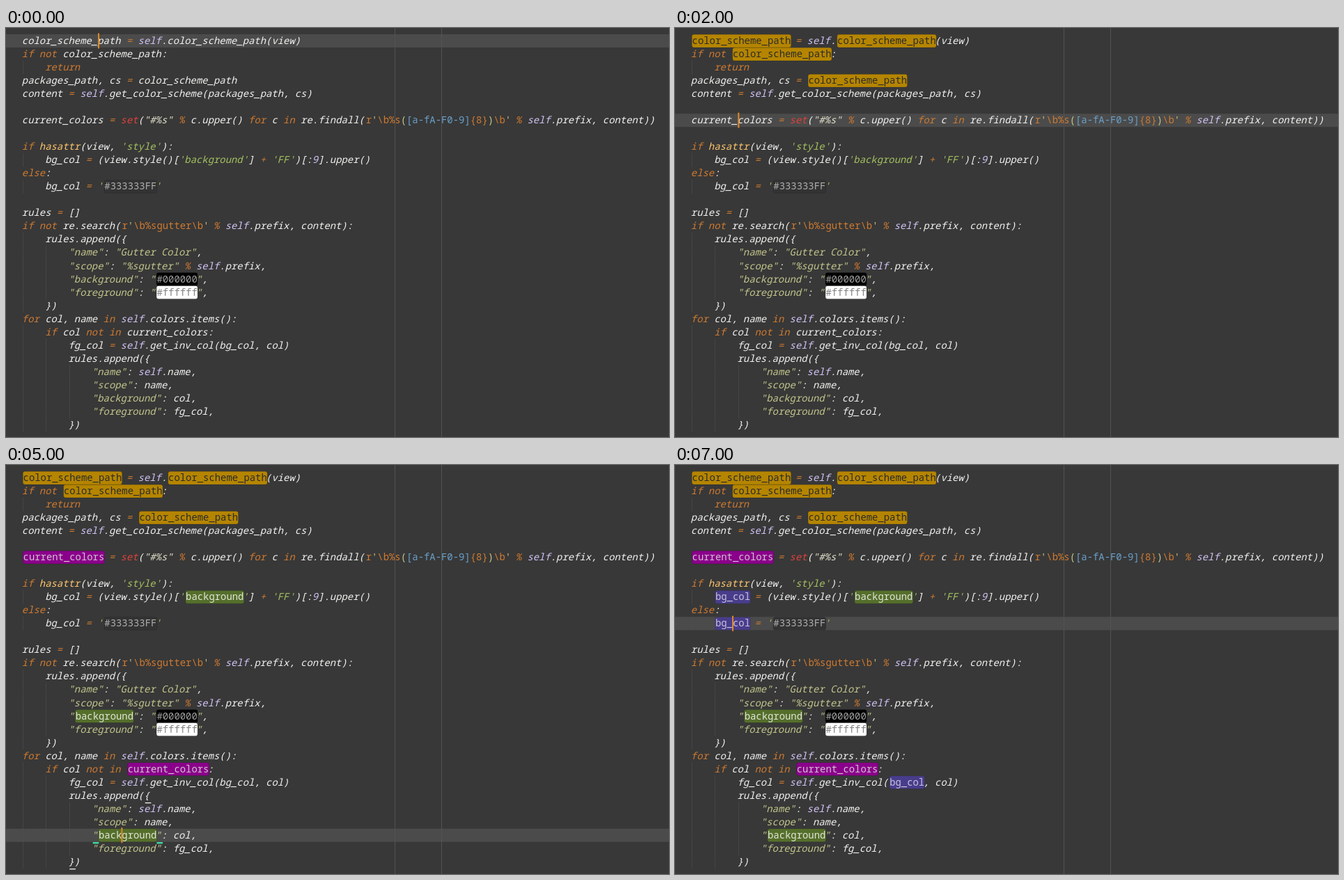
An HTML page for the animation above (8 s loop, 952 px wide and 588 px high).

```html
<!DOCTYPE html>
<html lang="en">
<head>
<meta charset="utf-8">
<title>Highlighting words in an editor</title>
<style>
  html, body { margin: 0; width: 100%; height: 100%; overflow: hidden; background: #383838; }
  svg { display: block; width: 952px; height: 588px; }
  text { font: 300 13.9px "Noto Sans Mono", "DejaVu Sans Mono", monospace; white-space: pre; }
  .code { font-style: italic; }
</style>
</head>
<body>
<svg id="stage" viewBox="0 0 952 588"></svg>
<script>
const source = String.raw`color_scheme_path = self.color_scheme_path(view)
if not color_scheme_path:
    return
packages_path, cs = color_scheme_path
content = self.get_color_scheme(packages_path, cs)

current_colors = set("#%s" % c.upper() for c in re.findall(r'\b%s([a-fA-F0-9]{8})\b' % self.prefix, content))

if hasattr(view, 'style'):
    bg_col = (view.style()['background'] + 'FF')[:9].upper()
else:
    bg_col = '#333333FF'

rules = []
if not re.search(r'\b%sgutter\b' % self.prefix, content):
    rules.append({
        "name": "Gutter Color",
        "scope": "%sgutter" % self.prefix,
        "background": "#000000",
        "foreground": "#ffffff",
    })
for col, name in self.colors.items():
    if col not in current_colors:
        fg_col = self.get_inv_col(bg_col, col)
        rules.append({
            "name": self.name,
            "scope": name,
            "background": col,
            "foreground": fg_col,
        })`.split('\n');

const LEFT = 24.6, TOP = 9, CHAR = 8.34, LINE = 19.03, STEP_MS = 1000, STEPS = 8;
const SLANT_SHIFT = 1.8; // slanted glyphs start left of their cell
const TEXT = '#f2f2f0', ORANGE = '#cf7a30', KHAKI = '#c3c68c', GREEN = '#a5c261', BLUE = '#6a9fc8';
const wordColors = { self: '#d2c3f6', 9: '#d2c3f6', set: '#e0423c', hasattr: '#ffc66d', '"#%s"': '#e4e2cc' };
for (const word of 'if not return for in else = % +'.split(' ')) wordColors[word] = ORANGE;

// Marked words: step of appearance, fill and text colour
const marks = {
  color_scheme_path: [1, '#b58500', '#2c2c2c'],
  current_colors: [3, '#8b008b', '#d2c4d2'],
  background: [5, '#556f2b', '#e2e6da'],
  bg_col: [7, '#483d8b', '#c6c2da']
};
const swatches = {
  '#333333FF': [0, '#333333', '#adadad'],
  '#000000': [0, '#000000', '#a0a0a0'],
  '#ffffff': [0, '#ffffff', '#858585']
};

// Caret row and column, two steps each
const carets = [[0, 13], [6, 8], [27, 17], [11, 7]];

const x = col => LEFT + col * CHAR;
const y = row => TOP + row * LINE;
const rect = (left, top, width, height, fill, extra = '') =>
  `<rect x="${left}" y="${top}" width="${width}" height="${height}" fill="${fill}" ${extra}/>`;
const label = (text, row, col, fill, style) =>
  `<text x="${x(col) - (style ? SLANT_SHIFT : 0)}" y="${y(row) + 14}" fill="${fill}" class="${style}">${text}</text>`;

function piece(text, row, col, color, step, style = 'code') {
  const badge = marks[text] || swatches[text];
  if (!badge || step < badge[0]) return label(text, row, col, color, style);
  const [, fill, ink] = badge;
  return rect(x(col) - 0.3, y(row) + 0.3, text.length * CHAR + 0.6, LINE - 0.4, fill,
    'rx="3" stroke="#000" stroke-opacity=".12"') + label(text, row, col, ink, '');
}

function regexColor(part) {
  if (part[0] === '[') return BLUE;
  return /^['()]/.test(part) ? KHAKI : ORANGE;
}

function codeLine(line, row, step) {
  let out = '';
  for (const { 0: token, index } of line.matchAll(/r'.*?'|"[^"]*"|'[^']*'|\w+|\S/g)) {
    if (token.startsWith("r'")) {
      for (const part of token.matchAll(/\[.*?\]|['()]|[^'()[\]]+/g))
        out += piece(part[0], row, index + part.index, regexColor(part[0]), step, '');
    } else if (/^['"]/.test(token)) {
      const body = token.slice(1, -1), quote = token[0];
      const color = wordColors[token] || (quote === '"' ? KHAKI : GREEN);
      out += piece(quote, row, index, color, step)
        + piece(body, row, index + 1, color, step)
        + piece(quote, row, index + token.length - 1, color, step);
    } else {
      out += piece(token, row, index, wordColors[token] || TEXT, step);
    }
  }
  return out;
}

function indentGuides(line, row) {
  let out = '';
  for (let col = 0; col < line.search(/\S/); col += 4)
    out += `<path d="M${Math.floor(x(col)) + 0.5} ${y(row)}v${LINE}" stroke="#525252" stroke-dasharray="1 1"/>`;
  return out;
}

const underline = (row, col, color, height) => rect(x(col), y(row) + 19.3, 8.6, height, color);

function render(step) {
  const [row, col] = carets[step >> 1];
  let out = rect(0, y(row), 952, LINE, '#4b4b4b');
  for (const ruler of [64, 72]) out += rect(Math.floor(x(ruler)), 0, 1, 588, '#525252');
  source.forEach((line, i) => out += indentGuides(line, i) + codeLine(line, i, step));
  if (row === 27) {
    out += underline(24, 21, '#e8e8e8', 1.4) + underline(29, 8, '#e8e8e8', 1.4)
      + underline(27, 12, '#3fdca0', 2.4) + underline(27, 23, '#3fdca0', 2.4);
  }
  // The caret blinks off on the second step, leaving only its tip
  out += rect(x(col) - 1, y(row) - 1.5, 2, step === 1 ? 2 : 22, '#e08a26');
  document.getElementById('stage').innerHTML = out;
}

let shown = -1;
function tick() {
  const step = Math.floor(performance.now() / STEP_MS) % STEPS;
  if (step !== shown) render(shown = step);
  requestAnimationFrame(tick);
}
tick();
</script>
</body>
</html>
```
